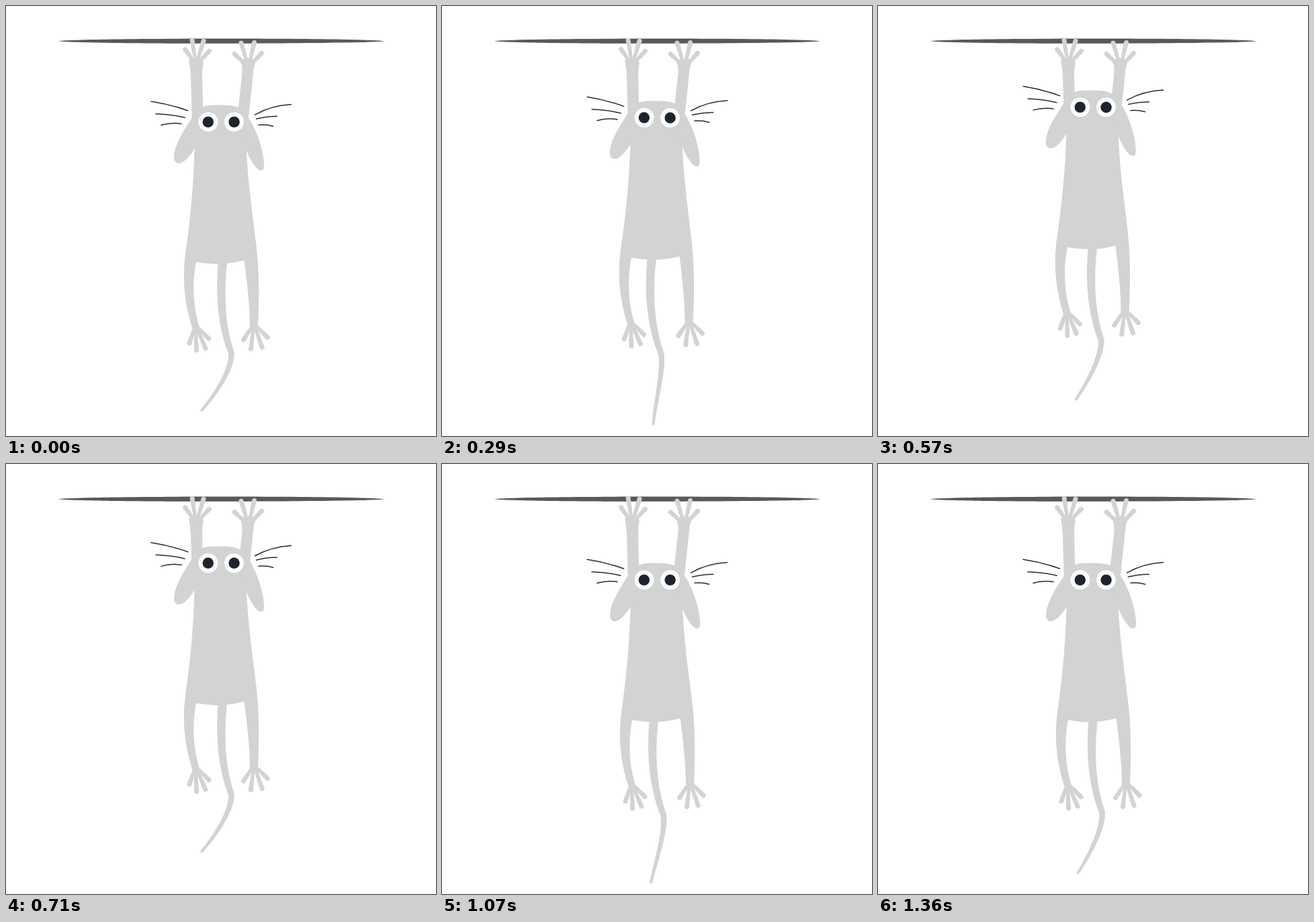
An HTML page that plays this animation: 640 px wide and 640 px high, repeating every 1.43 s.

```html
<!DOCTYPE html>
<html>
<head>
<meta charset="utf-8">
<style>
html, body { margin: 0; height: 100%; overflow: hidden; background: #fff; }
svg { display: block; width: 100vw; height: 100vh; }
</style>
</head>
<body>
<svg viewBox="0 0 640 640" fill="#d3d3d3">
  <path fill="#59595b" d="M78 52.2C110 47.4 530 47.4 563 52.2C530 57 110 57 78 52.2Z"/>
  <g id="arms">
    <path d="M272 81Q274 90 275 105L277 180H294L292 105Q292 92 294 84L290 78H278Z"/>
    <path d="M349 83Q352 90 351.5 100L346 150 343 180H359.5L368 100Q368.5 90 372 82L366 78H355Z"/>
  </g>
  <g id="body">
    <path id="tail"/>
    <path d="M279 168C286 146 302 147.5 318 147.5S352 147 361 168L358 215C360 265 369 325 373 360C377 400 377 435 375 477H363C363 445 358 405 354.5 378.5Q320 388 283 381C278 405 277 445 288 478L283 484 277 479C265 440 262 405 267.5 365C274 320 279 270 280.5 213Z"/>
    <path d="M277 166C264 186 250.5 207 250 224C250 236 258 236 265 231Q273 225 281 212L290 190Z"/>
    <path d="M361 166C373 185 384 215 384 238C384 247 377 247 371 239Q362 227 358 215L350 190Z"/>
    <path fill="none" stroke="#2b2b2d" stroke-width="1.5" stroke-linecap="round" d="M216 142Q245 146.5 270.5 155.8M223 160.4Q248 161.3 266 166M231 177.2Q246 172.7 261 175.4M370.5 161.8Q395 148 424.5 146.5M372.5 168Q388 164 403.5 164.2M376 177Q388 176 397.5 179"/>
    <g fill="#f9fbfd"><circle cx="301" cy="172.5" r="14.5"/><circle cx="339.5" cy="172.5" r="14.5"/></g>
    <g fill="#1d242c"><circle cx="300.8" cy="172.6" r="8.2"/><circle cx="339.6" cy="172.6" r="8.2"/></g>
  </g>
</svg>
<script>
const DURATION = 1430, FPS = 14, STEPS = 20, HALF = STEPS / 2;
const TOP = 9, LANDED = 15, HEIGHT = 26.5;
const arms = document.getElementById('arms');
const body = document.getElementById('body');
const tail = document.getElementById('tail');

// Four teardrop digits fanned around a direction, the inner two longer
function paw(parent, x, y, direction, spread) {
  for (let i = -1.5; i <= 1.5; i++) {
    const length = Math.abs(i) > 1 ? 32 : 41, end = length - 3.5;
    const digit = document.createElementNS('http://www.w3.org/2000/svg', 'path');
    digit.setAttribute('d', `M0-2Q${length / 2}-3 ${end}-3.5A3.5 3.5 0 0 1 ${end} 3.5Q${length / 2} 3 0 2Z`);
    digit.setAttribute('transform', `translate(${x} ${y}) rotate(${direction + i * spread})`);
    parent.append(digit);
  }
}
paw(arms, 283, 88, -86, 26);
paw(arms, 361, 91, -92, 30);
paw(body, 282, 475, 77, 21);
paw(body, 369, 473, 84, 26);

// Tail centre line: two joined Bezier curves, root to knee to tip
const curled = [[323, 375], [316, 440], [324, 486], [335.5, 517], [336, 540], [315, 574], [291.5, 601.5]];
const straight = [[316.5, 375], [309, 440], [317, 488], [330, 522], [333, 548], [318, 590], [310, 621]];
const mix = (a, b, t) => a.map((v, i) => v + (b[i] - v) * t);

function bezier(points, t) {
  while (points.length > 1) points = points.slice(1).map((p, i) => mix(points[i], p, t));
  return points[0];
}

function tailPath(swing) {
  const points = curled.map((p, i) => mix(p, straight[i], swing));
  const at = u => u < 1 ? bezier(points.slice(0, 4), u) : bezier(points.slice(3), u - 1);
  const left = [], right = [];
  for (let i = 0; i <= 48; i++) {
    const u = i / 24, [x, y] = at(u);
    const [x0, y0] = at(Math.max(u - .06, 0)), [x1, y1] = at(Math.min(u + .06, 2));
    const half = (13.5 - 4.7 * u) / 2 / Math.hypot(x1 - x0, y1 - y0);
    const dx = (y1 - y0) * half, dy = (x1 - x0) * half;
    left.push([x - dx, y + dy]);
    right.unshift([x + dx, y - dy]);
  }
  const tip = right.shift();
  return `M${left.join('L')}A2 2 0 0 0 ${tip}L${right.join('L')}Z`;
}

// Slow pull up, then a quicker drop
function lift(step) {
  if (step < TOP) return HEIGHT * (1 - Math.cos(Math.PI / 2 * step / TOP));
  const fall = Math.min((step - TOP) / (LANDED - TOP), 1);
  return HEIGHT * Math.max(Math.cos(Math.PI / 2 * fall), 0) ** 1.6;
}

// The tail swings out twice, the second time mirrored in time
function swing(step) {
  const d = Math.abs(step - HALF);
  return 1.37 * (d < 6 ? (d / 6) ** 1.4 : (HALF - d) / 4);
}

function draw() {
  const time = performance.now() % DURATION;
  const step = Math.floor((Math.floor(time / 10) * 10 + 5) * FPS / 1000);
  const tilt = step > 2 && step < HALF ? .4 * Math.sin(Math.PI * (step - 2) / 8) : 0;
  body.setAttribute('transform', `translate(0 ${-lift(step)}) rotate(${tilt} 319 172)`);
  tail.setAttribute('d', tailPath(swing(step)));
  requestAnimationFrame(draw);
}
draw();
</script>
</body>
</html>
```
